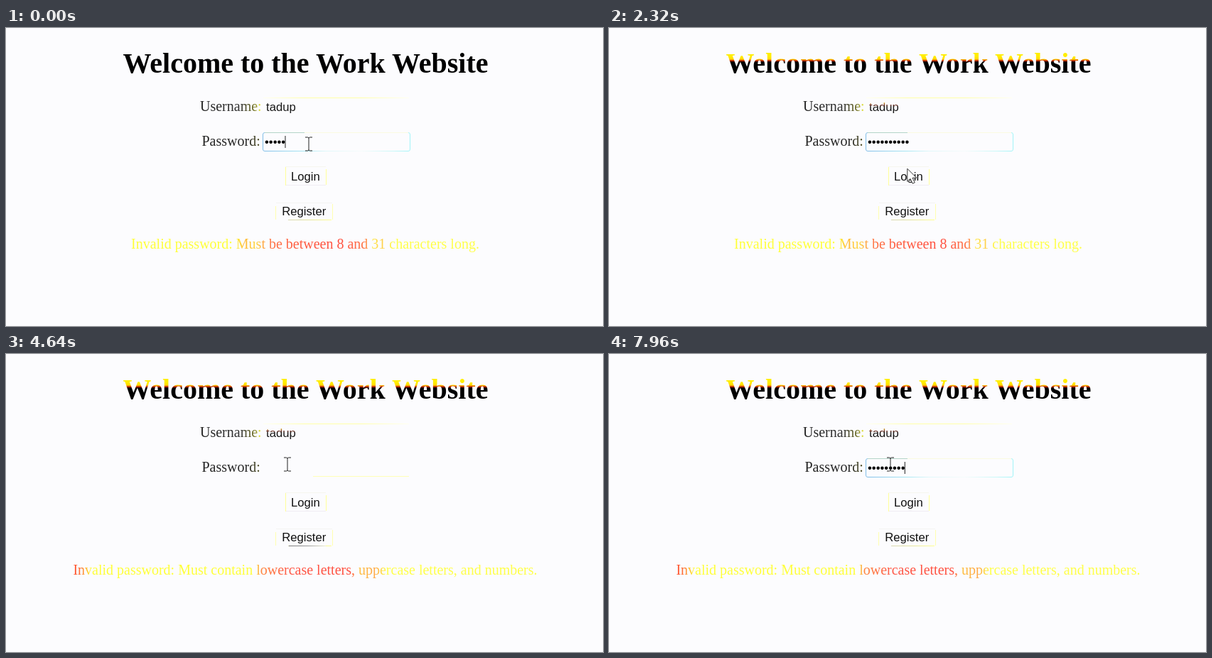
Write an HTML page that moves like this. It is 840x420 px and loops after 8000 ms.

```html
<!DOCTYPE html>
<html lang="en">
<head>
<meta charset="utf-8">
<title>Login form</title>
<style>
  html, body { margin: 0; width: 100%; height: 100%; overflow: hidden; background: #fcfcfe; }
  svg { display: block; width: 840px; height: 420px; }
  .serif { font: 20px "Liberation Serif", "Times New Roman", serif; }
  .sans { font: 16.667px "Liberation Sans", Arial, sans-serif; }
  h1, .title { font: bold 40px "Liberation Serif", "Times New Roman", serif; }
  .mid { text-anchor: middle; }
  .line { fill: none; stroke-width: 1; }
</style>
</head>
<body>
<svg viewBox="0 0 840 420" xmlns="http://www.w3.org/2000/svg">
  <defs id="defs"></defs>
  <rect width="840" height="420" fill="#fcfcfe"/>

  <text id="title" class="title mid" x="421.5" y="63">Welcome to the Work Website</text>

  <text class="serif" x="273" y="117" fill="url(#userLabel)">Username:</text>
  <text id="user" class="sans" x="366" y="117">tadup</text>
  <path class="line" d="M362 98.5H567" stroke="url(#userEdge)"/>

  <text class="serif" x="275.5" y="166" fill="url(#passLabel)">Password:</text>
  <path id="idle" class="line" d="M432 172.5H567" stroke="#ffffb8"/>
  <g id="focus">
    <rect class="line" x="361.5" y="147.5" width="207" height="26" rx="2.5" stroke="url(#ring)"/>
    <path class="line" d="M364 147.5H420" stroke="#b4d4c8"/>
    <path class="line" d="M420 147.5H566" stroke="#fafae0"/>
  </g>
  <text id="dots" class="sans" x="364" y="166"></text>
  <rect id="caret" y="152" width="1" height="17" fill="#222"/>

  <g class="line">
    <path d="M393.5 222V195.5M450.5 199V221" stroke="#ffff9a"/>
    <path d="M393 195.5H450" stroke="#f6f6ee"/>
    <path d="M394 221.5H450" stroke="#f0ecf4"/>
    <path d="M379.5 251V270M459.5 248V270" stroke="#ffffb0"/>
    <path d="M380 246.5H459" stroke="#f4f4f2"/>
    <path d="M397 270.5H458" stroke="url(#buttonEdge)"/>
  </g>
  <path id="hover" class="line" d="M379.5 246V270.5H459.5V247" stroke="#d0d0c8"/>
  <path id="pressed" class="line" d="M398 270.5H450" stroke="url(#pressedEdge)"/>
  <text class="sans mid" x="421.3" y="215" fill="#111">Login</text>
  <text class="sans mid" x="419.3" y="264" fill="#111">Register</text>

  <text id="message" class="serif mid" x="421" y="311"></text>

  <path id="beam" class="line" stroke="#222" stroke-width="1.6"
        d="M-5 -9H-1.5L0 -8L1.5 -9H5M0 -8V9M-5 10H-1.5L0 9L1.5 10H5"/>
  <path id="arrow" fill="#fff" stroke="#333" stroke-width="1"
        d="M0 0V18L4.2 14.2L7.4 21L10.4 19.6L7.3 13H13Z"/>
</svg>
<script>
const LOOP = 8000;
const DOT = 16.667 * 0.35;
const $ = id => document.getElementById(id);
const show = (id, on) => $(id).setAttribute("visibility", on ? "visible" : "hidden");

// Each stop is "position colour" in stage pixels along one axis.
function gradient(id, axis, from, to, stops) {
  const line = axis === "x" ? `x1="${from}" x2="${to}" y1="0" y2="0"`
                            : `y1="${from}" y2="${to}" x1="0" x2="0"`;
  const marks = stops.split(",").map(stop => {
    const [at, color] = stop.trim().split(" ");
    return `<stop offset="${(at - from) / (to - from)}" stop-color="${color}"/>`;
  });
  $("defs").insertAdjacentHTML("beforeend",
    `<linearGradient id="${id}" gradientUnits="userSpaceOnUse" ${line}>${marks.join("")}</linearGradient>`);
}

gradient("titleTint", "y", 34, 64, "40 #ffee00, 44 #ffd800, 46 #d02800, 48 #000");
gradient("userTint", "y", 104, 120, "105 #e8c040, 108 #803828, 111 #181818");
gradient("userLabel", "x", 273, 360, "273 #222, 330 #333, 350 #77772a, 357 #e0e040");
gradient("passLabel", "x", 275, 358, "275 #222, 340 #2a2a2a, 357 #55552a");
gradient("userEdge", "x", 362, 567, "362 #fffff0, 420 #ffffa8, 500 #ffffa8, 567 #fffff0");
gradient("buttonEdge", "x", 397, 458, "397 #d8d8b0, 425 #e4e4a0, 458 #ffff90");
gradient("pressedEdge", "x", 398, 450, "398 #777, 425 #999, 450 #eeeed0");
gradient("ring", "x", 361, 569, "361 #80bde8, 420 #a8e8f4, 450 #e0f8fa, 500 #f6fcfc, 545 #c8f8f8, 569 #a0f4f8");
gradient("shortTint", "x", 176, 667,
  "176 #ffff38, 322 #ffff38, 335 #ffb838, 352 #ffd840, 372 #ff7848, 400 #ff6040, 470 #ff5040, 505 #ff7848, 515 #ffe848, 530 #ffd048, 545 #ffff48, 667 #ffff48");
gradient("longTint", "x", 96, 747,
  "96 #ff5030, 106 #ff7838, 120 #ffff38, 350 #ffff38, 358 #ff8840, 400 #ff5848, 485 #ff5040, 496 #ffc040, 520 #ffa848, 535 #ffff48, 747 #ffff48");

const first = { dots: 5, keys: [330, 600, 860, 1190, 1590] };
const second = { dots: 0, keys: [5630, 5760, 5960, 6230, 6440, 6640, 7060, 7560, 7830] };
const SUBMIT = 3320, BLUR = 3250, FOCUS = 4840;

// Pointer stops: time, x, y
const path = [
  [2060, 426, 163], [2720, 408, 265], [2920, 408, 265], [3050, 405, 262],
  [3980, 405, 262], [4640, 396, 155], [LOOP, 396, 155]
];

function pointer(t) {
  if (t <= path[0][0]) return path[0].slice(1);
  const i = path.findIndex(p => p[0] >= t);
  const [a, b] = [path[i - 1], path[i]];
  const u = (t - a[0]) / (b[0] - a[0]);
  const ease = u * u * (3 - 2 * u);
  return [1, 2].map(k => a[k] + (b[k] - a[k]) * ease);
}

function render(t) {
  const late = t >= SUBMIT;
  const typing = late ? second : first;
  const typed = typing.keys.filter(k => k <= t);
  const count = typing.dots + typed.length;
  const focused = t < BLUR || t >= FOCUS;
  const lastKey = typed.length ? typed[typed.length - 1] : late ? FOCUS : 0;

  $("title").setAttribute("fill", t < 130 ? "#000" : "url(#titleTint)");
  $("user").setAttribute("fill", t < 130 ? "#181818" : "url(#userTint)");
  $("dots").textContent = "•".repeat(count);
  $("caret").setAttribute("x", 364 + count * DOT - 0.7);
  show("caret", focused && Math.floor((t - lastKey) / 530) % 2 === 0);
  show("focus", focused);
  show("idle", !focused);

  $("message").textContent = "Invalid password: Must " + (late
    ? "contain lowercase letters, uppercase letters, and numbers."
    : "be between 8 and 31 characters long.");
  $("message").setAttribute("fill", late ? "url(#longTint)" : "url(#shortTint)");

  const [x, y] = pointer(t);
  const inField = y > 147 && y < 174;
  show("beam", inField);
  show("arrow", !inField);
  for (const id of ["beam", "arrow"]) $(id).setAttribute("transform", `translate(${x} ${y})`);
  show("hover", y > 246 && y < 271);
  show("pressed", t >= SUBMIT && t < FOCUS);
}

const start = performance.now();
function tick() {
  render((performance.now() - start) % LOOP);
  requestAnimationFrame(tick);
}
tick();
</script>
</body>
</html>
```
